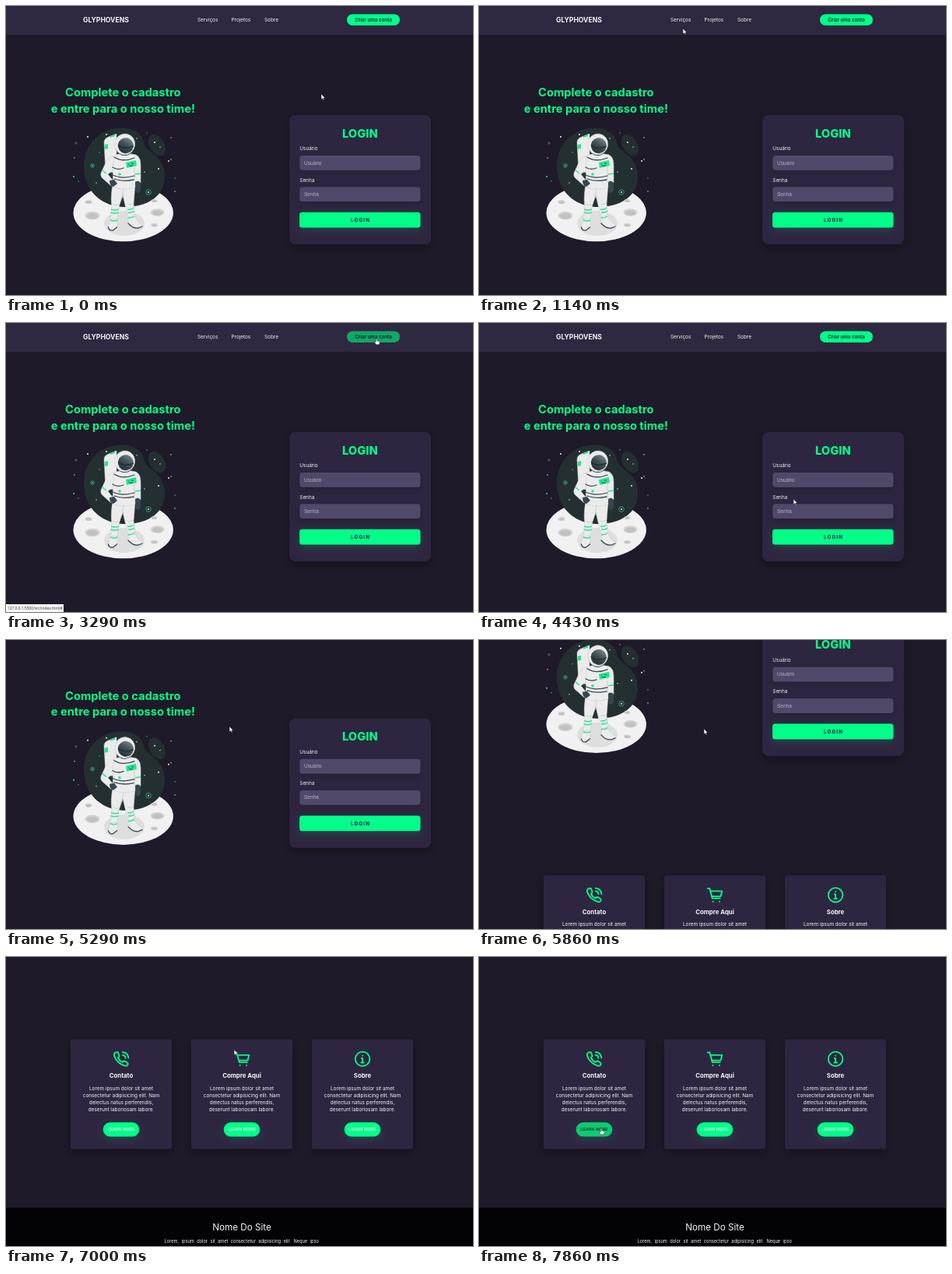
Animation of 600x371 px, one loop 8 s. Source, as an HTML page:

```html
<!DOCTYPE html>
<html lang="pt-BR">
<head>
<meta charset="utf-8">
<title>Login</title>
<style>
  html, body { margin: 0; width: 100%; height: 100%; overflow: hidden; background: #1e1a29; }
  svg { display: block; width: 100%; height: 100%; }
  text { font: 6.4px Inter, "Open Sans", sans-serif; fill: #f4f4f8; }
  .mid { text-anchor: middle; }
  .panel { fill: #2f2841; }
  .green { fill: #00ff88; }
  .title { font-size: 14.7px; font-weight: 700; fill: #00ff88; }
  .field { fill: #514869; }
  .hint { font: 6.5px "Liberation Sans", Arial, sans-serif; fill: #b8b1c6; }
  .icon { fill: none; stroke: #00ff88; stroke-width: 2.2; stroke-linecap: round; stroke-linejoin: round; }
  .more { font: 700 5.3px "Liberation Sans", Arial, sans-serif; fill: #d5ffe9; }
  .suit { fill: #ebebeb; stroke: #c6cacb; stroke-width: .5; }
  .dark { fill: #37474f; }
  .mint { fill: #20e88f; }
  .strap { fill: none; stroke: #37474f; stroke-width: 1.3; stroke-linecap: round; }
  .band { fill: none; stroke: #2be59a; stroke-width: 1.5; }
  .hover { fill: #12a866; }
  .hover.soft { fill: #0bcb70; }
  .hover + .more { fill: #173f34; }
</style>
</head>
<body>
<svg viewBox="0 0 600 371">
  <defs>
    <filter id="shadow" x="-30%" y="-30%" width="160%" height="170%">
      <feDropShadow dx="0" dy="4" stdDeviation="6" flood-color="#000" flood-opacity=".34"/>
    </filter>
    <filter id="soft" x="-20%" y="-60%" width="140%" height="260%">
      <feDropShadow dx="0" dy="3" stdDeviation="5" flood-color="#000" flood-opacity=".2"/>
    </filter>
    <filter id="glow" x="-20%" y="-60%" width="140%" height="260%">
      <feDropShadow dx="0" dy="4" stdDeviation="5" flood-color="#00ff88" flood-opacity=".13"/>
    </filter>
    <linearGradient id="visor" x1=".7" y1="0" x2=".3" y2="1">
      <stop stop-color="#75858b"/><stop offset=".5" stop-color="#3d4c53"/><stop offset="1" stop-color="#263238"/>
    </linearGradient>
  </defs>
  <g id="page">
    <rect class="panel" width="600" height="37"/>
    <text x="99" y="20.8" style="font-size:8.6px;font-weight:700">GLYPHOVENS</text>
    <text x="246" y="20">Serviços</text>
    <text x="289.5" y="20">Projetos</text>
    <text x="332" y="20">Sobre</text>
    <rect id="signup" class="green" x="438" y="10.5" width="68" height="14.5" rx="7.2"/>
    <text class="mid" x="472" y="20" style="font-size:6.2px;font-weight:600;fill:#211b2d">Criar uma conta</text>

    <text class="title mid" x="150.3" y="116">Complete o cadastro</text>
    <text class="title mid" x="150.3" y="136.6">e entre para o nosso time!</text>

    <ellipse cx="150.7" cy="265.500" rx="64.2" ry="36.7" fill="#f1f1f1"/>
    <g id="sky" fill="#242f32">
      <path d="M100 207C99 177 122 156.500 148 156.500C165 156.500 175 164 177 175C179 189 204 190 204 219C204 247 177 259 150 258C119 256 101 235 100 207Z"/>
      <ellipse cx="194" cy="178.500" rx="9.500" ry="15" transform="rotate(-30 194 178.500)"/>
    </g>
    <g fill="none" stroke="#2be59a" stroke-width=".6">
      <circle cx="183" cy="239" r="3.3"/><circle cx="111" cy="205" r="2.3"/>
    </g>
    <circle cx="90" cy="176" r="1.8" fill="#4b4b57"/>
    <g id="craters"></g>

    <g id="astronaut">
      <path class="suit" d="M126 175Q126 170 132 168L142 164V214L128 213Z"/>
      <path class="mint" d="M127 178l4-1v6l-4 1ZM134 167l6-2.500v2.500l-6 2ZM127 204l4 1v5l-4-1Z"/>
      <path class="suit" d="M138 192C130 194 128 202 124 210Q119 218 125 222L135 231L140 227L131 216L141 208Z"/>
      <path class="suit" d="M137 229Q134 246 136 258L134 275Q136 279 143 277L145 258L150 243L157 272Q162 275 166 271L164 254L166 229Z"/>
      <path class="suit" d="M138 192Q151 187 167 191Q173 194 173 204V227Q169 230 166 227V233Q151 238 137 232Z"/>
      <path d="M151 234L149 247M137 254q4 3 8 1M156 254q4 2 8-1M165 200V226" fill="none" stroke="#bfc4c4" stroke-width=".7"/>
      <path class="dark" d="M166 226Q170 223 173 227L173 236Q170 243 167 238ZM133 224l6-1l4 5l-5 4q-5-1-5-8Z"/>
      <path class="strap" d="M139 194Q150 201 165 195M137 207Q143 211 151 208M135 216Q148 223 165 218M139 222Q151 226 164 223"/>
      <path class="band" d="M124 211l5 4M166 216l7-1M135 261q5 2 10 0M134.500 265q5 2 10 0M156 261q5 1 8-2M157 265q5 1 8-2"/>
      <path class="mint" d="M154 201l13-3l1 7l-13 3Z"/>
      <path d="M157 203h1M161 202h3M158 205h5" stroke="#37474f" stroke-width="1.1"/>
      <circle class="mint" cx="146" cy="216" r="1.8"/>
      <g transform="rotate(10 153 178)">
        <path class="strap" stroke-width="2" d="M143 186Q153 197 163 186"/>
        <ellipse class="suit" cx="152.500" cy="177.500" rx="13" ry="13.500"/>
        <ellipse cx="154" cy="179" rx="10" ry="10" fill="url(#visor)"/>
        <path d="M144 180Q154 185 164 178" fill="none" stroke="#202b30" stroke-width="1.2"/>
      </g>
      <path class="suit" d="M134 274l9-1v9q-2 7-8 7q-5-1-4-6ZM157 271l8-2q2 7 10 12q1 5-6 5q-9-2-12-7Z"/>
      <path class="strap" d="M131.500 284q1 5 6 4l5-4M157 279q6 7 13 6l5-2"/>
      <path class="band" d="M134 275q5 2 9 0M157 272q5 0 8-2"/>
    </g>

    <rect class="panel" filter="url(#shadow)" x="364" y="140" width="182" height="166" rx="8"/>
    <text class="title mid" x="454.800" y="168.500" style="font-weight:800">LOGIN</text>
    <text x="377.3" y="185.2">Usuário</text>
    <rect class="field" filter="url(#soft)" x="377.3" y="192" width="155" height="18.800" rx="4"/>
    <text class="hint" x="383" y="203.500">Usuário</text>
    <text x="377.3" y="225.700">Senha</text>
    <rect class="field" filter="url(#soft)" x="377.3" y="232.300" width="155" height="18.800" rx="4"/>
    <text class="hint" x="383" y="243.800">Senha</text>
    <rect id="login" class="green" filter="url(#glow)" x="377" y="264.800" width="155.500" height="19.800" rx="3.500"/>
    <text class="mid" x="455.500" y="277" style="font-size:6.2px;font-weight:700;letter-spacing:1.2px;fill:#2b134b">LOGIN</text>

    <g id="cards"></g>

    <rect y="675.500" width="600" height="80" fill="#030205"/>
    <text class="mid" x="303" y="705" style="font-size:11.7px">Nome Do Site</text>
    <text class="mid" x="302.700" y="721" style="font-size:5.7px;word-spacing:1.8px">Lorem, ipsum dolor sit amet consectetur adipisicing elit. Neque ipso</text>
  </g>

  <g id="status">
    <rect y="361" width="74" height="10" fill="#f5f5f6"/>
    <text x="2" y="368.300" style="font:4.9px 'Open Sans',sans-serif;fill:#33313a">127.0.0.1:5500/src/index.html#</text>
  </g>
  <g id="cursor" fill="#fff" stroke="#17131f" stroke-width=".5">
    <path id="arrow" d="M0 0V7L1.700 5.500L2.800 8L3.900 7.500L2.800 5.100H5Z"/>
    <path id="hand" d="M-.8 .5Q0-.6 .8.5V3L3.600 3.700Q4.500 4 4.200 5.300L3.500 8H-.4L-2.700 5Q-2.600 3.800-1.600 4.400L-.8 5Z"/>
  </g>
</svg>
<script>
const LOOP = 8000, FPS = 7, NOTCH = 39.3;
const byId = id => document.getElementById(id);

// Stars
const stars = [[105,168],[120,188],[116,227],[129,165],[168,170],[181,163],[191,175],[198,181],
  [88,195],[87,219],[212,169],[212,197],[209,199],[217,221],[217,238],[196,209],[178,213],[93,225],[183,239],[111,205]];
byId("sky").innerHTML += stars.map(([x, y], i) =>
  `<circle cx="${x}" cy="${y}" r="${i % 3 ? .7 : 1}" fill="${i % 4 === 1 ? "#2be59a" : "#f0f0f0"}"/>`).join("");

// Craters: x, y, rx, ry
const craters = [[152,279,26,16],[111,269,9.5,5.3],[194.5,265,9,4.8],[106,251.5,4.5,2.5],[190.5,250,4,2],[190.5,281,4.5,2.3]];
byId("craters").innerHTML = craters.map(([x, y, rx, ry], i) =>
  `<ellipse cx="${x}" cy="${y}" rx="${rx}" ry="${ry}" fill="${i ? "#d2d2d2" : "#dedede"}"/>` +
  (i ? `<ellipse cx="${x}" cy="${y + .6}" rx="${rx * .75}" ry="${ry * .68}" fill="#c1c1c1"/>` : "")).join("");

// Feature cards, icons on a 24-unit grid
const blurb = ["Lorem ipsum dolor sit amet", "consectetur adipisicing elit. Nam",
  "delectus natus perferendis,", "deserunt laboriosam labore."];
const features = [
  ["Contato", "M2 3Q4 1 7 2L9 7Q9 9 7 10Q9 15 14 17Q15 15 17 15L22 18Q23 20 21 22Q18 24 12 20Q5 16 2 9Q0 5 2 3M14 6A5 5 0 0 1 18.500 10.500M14 1.500A9 9 0 0 1 23 10.500"],
  ["Compre Aqui", "M1 2H4L8 17H20M5 6H23L21 14H7.500M9 22h.1M19 22h.1"],
  ["Sobre", "M12 1A11 11 0 1 1 12 23A11 11 0 1 1 12 1M10.500 11H12V17M10 17.500H14M12 7h.1"]
];
byId("cards").innerHTML = features.map(([name, icon], i) => {
  const left = 83 + 155 * i, mid = left + 65;
  return `<rect class="panel" filter="url(#shadow)" x="${left}" y="459.500" width="130" height="140.500" rx="3"/>
    <path class="icon" transform="translate(${mid - 10} 474.500) scale(.84)" d="${icon}"/>
    <text class="mid" x="${mid}" y="508.800" style="font-size:7.8px;font-weight:700">${name}</text>` +
    blurb.map((line, n) => `<text class="mid" x="${mid}" y="${524.6 + 9.1 * n}">${line}</text>`).join("") +
    `<rect id="more${i}" class="green" filter="url(#glow)" x="${mid - 23.3}" y="566" width="46.600" height="18.300" rx="9.150"/>
    <text class="more mid" x="${mid}" y="577.100">LEARN MORE</text>`;
}).join("");

// Keyframes: tick, values...
const scrollKeys = [[0,0],[36,0],[37,1],[41,4],[46,7],[48,8],[49,9],[56,9]];
const cursorKeys = [[0,405,113],[2,458,128],[8,262,29],[9,260,18],[11,260,18],[12,302,18],[13,302,18],[14,341,18],
  [15,430,25],[16,512,20],[17,526,22],[19,490,18],[23,476,19.8],[26,472,20],[28,465,276],[30,456,275],[33,300,128],
  [34,287,111],[37,287,111],[41,289,114],[46,292.5,117],[49,293,119],[53,166,221],[55,157,220],[56,157,220]];

function sample(keys, tick) {
  const next = keys.findIndex(key => key[0] > tick);
  const a = keys[next - 1], b = keys[next], k = (tick - a[0]) / (b[0] - a[0]);
  return a.slice(1).map((v, i) => v + (b[i + 1] - v) * k);
}

const buttons = ["signup", "login", "more0", "more1", "more2"].map(byId);
const links = [[246,272], [289,315], [332,350]];

function isOver(button, x, y) {
  const { x: bx, y: by, width, height } = button.getBBox();
  return x >= bx && x <= bx + width && y >= by && y <= by + height;
}

function draw(now) {
  const tick = Math.floor((now % LOOP + 5) * FPS / 1000) % 56;
  const scroll = sample(scrollKeys, tick)[0] * NOTCH;
  const [x, y] = sample(cursorKeys, tick);
  const pageY = y + scroll;
  const onLink = pageY > 12 && pageY < 24 && links.some(([a, b]) => x >= a && x <= b);
  let active = null;
  for (const button of buttons) {
    const over = isOver(button, x, pageY);
    if (over) active = button;
    button.setAttribute("class", !over ? "green" : button.id === "signup" ? "hover" : "hover soft");
  }
  byId("page").setAttribute("transform", `translate(0 ${-scroll})`);
  byId("cursor").setAttribute("transform", `translate(${x} ${y})`);
  const pointing = onLink || active;
  byId("hand").style.display = pointing ? "" : "none";
  byId("arrow").style.display = pointing ? "none" : "";
  byId("status").style.display = onLink || active === buttons[0] ? "" : "none";
  requestAnimationFrame(() => draw(performance.now()));
}
draw(0);
</script>
</body>
</html>
```
